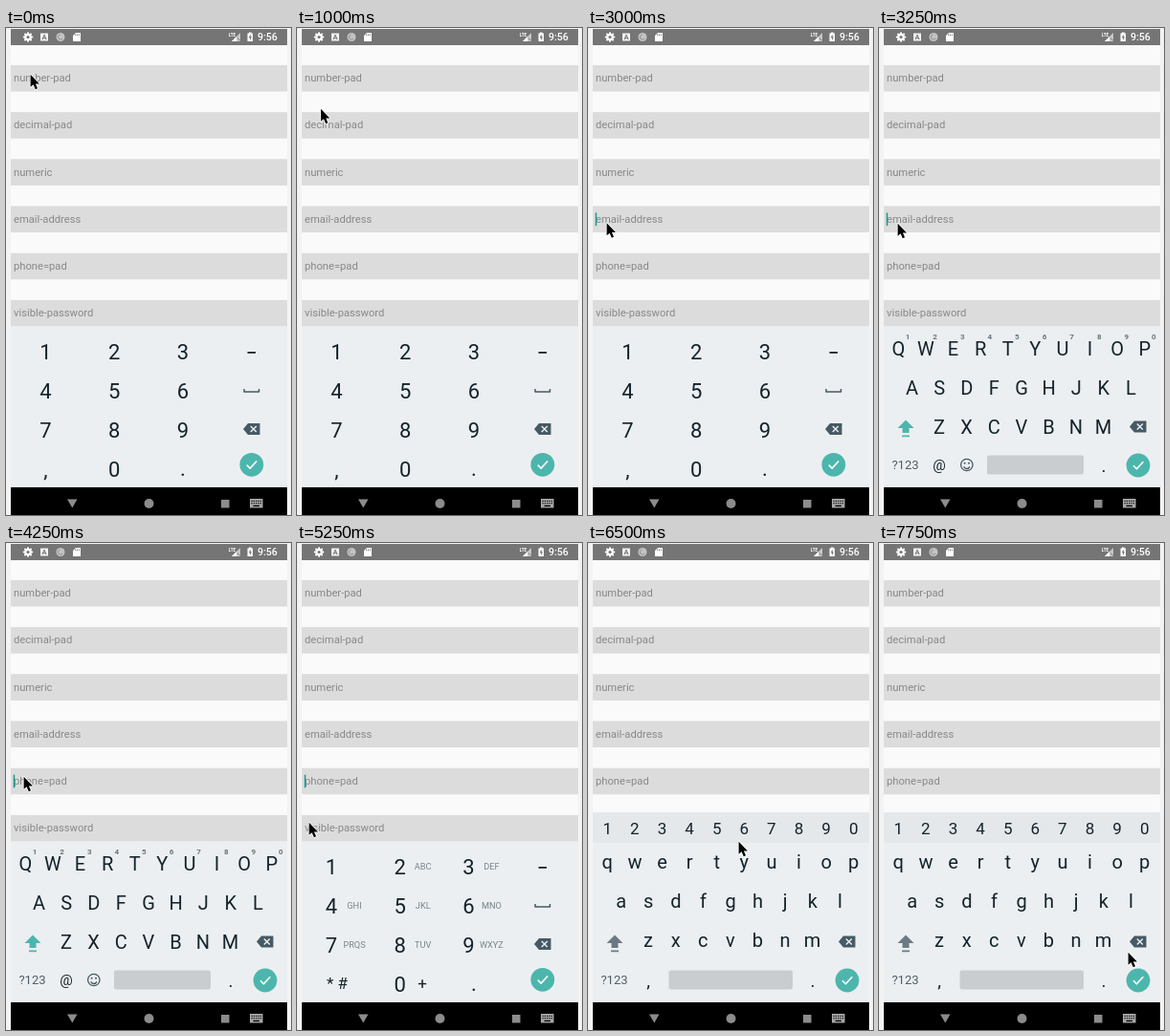
An HTML page with a canvas for the animation above (8000 ms loop, 298 px wide and 510 px high).

```html
<!DOCTYPE html>
<html lang="en">
<head>
<meta charset="utf-8">
<title>Keyboard types</title>
<style>
  html, body { margin: 0; width: 100%; height: 100%; overflow: hidden; background: #f3f3f3; }
  canvas { display: block; width: 298px; height: 510px; }
</style>
</head>
<body>
<canvas id="stage" width="298" height="510"></canvas>
<script>
const ctx = document.getElementById('stage').getContext('2d');
const LOOP = 8000, STEP = 250;
const INK = '#14232b', ICON = '#455a64', TEAL = '#4db6ac', KEYS = '#eceff1';
const BAR = '#757575', NAV = '#8c8c8c';
const TOP = 38.9, PITCH = 49.2, COL = 28.6, PAD_COL = 71.7, PAD_ROW = 40.8;
const fields = ['number-pad', 'decimal-pad', 'numeric', 'email-address', 'phone=pad', 'visible-password'];

// Step at which each field is tapped
const taps = [2, 5, 8, 12, 17, 22];
// Pointer stops: step, x, y
const stops = [
  [2, 25, 48], [5, 24, 102], [7, 21, 147], [8, 21, 149], [11, 19, 203], [13, 19, 204],
  [17, 18, 244], [21, 12, 292], [25, 12, 292], [26, 157, 312], [30, 266, 428], [31, 260, 428]
];

function rect(x, y, w, h, color) {
  ctx.fillStyle = color;
  ctx.fillRect(x, y, w, h);
}

function disc(x, y, r, color) {
  ctx.fillStyle = color;
  ctx.beginPath();
  ctx.arc(x, y, r, 0, Math.PI * 2);
  ctx.fill();
}

function arc(x, y, r, from, to, color, width) {
  ctx.beginPath();
  ctx.arc(x, y, r, from, to);
  ctx.strokeStyle = color;
  ctx.lineWidth = width;
  ctx.stroke();
}

// SVG path drawn relative to (x, y)
function icon(d, x, y, fill, stroke, width) {
  const shape = new Path2D(d);
  ctx.save();
  ctx.translate(x, y);
  ctx.lineJoin = 'round';
  if (stroke) {
    ctx.strokeStyle = stroke;
    ctx.lineWidth = width;
    ctx.stroke(shape);
  }
  if (fill) {
    ctx.fillStyle = fill;
    ctx.fill(shape);
  }
  ctx.restore();
}

function text(str, x, y, size, color = INK, align = 'center', weight = 400) {
  ctx.font = `${weight} ${size}px Roboto, sans-serif`;
  ctx.textAlign = align;
  ctx.fillStyle = color;
  ctx.fillText(str, x, y);
}

function row(chars, x, y, size, color, weight) {
  [...chars].forEach((c, i) => text(c, x + i * COL, y, size, color, 'center', weight));
}

// Three-column grid of pad labels
function grid(labels, x, y, size, color) {
  labels.forEach((s, i) =>
    text(s, x + (i % 3) * PAD_COL, y + Math.floor(i / 3) * PAD_ROW, size, color));
}

function statusBar() {
  rect(5, 1, 289, 17, BAR);
  // gear
  for (let i = 0; i < 8; i++) {
    const a = i * Math.PI / 4;
    disc(23 + 4.2 * Math.cos(a), 9.5 + 4.2 * Math.sin(a), 1.1, '#fff');
  }
  disc(23, 9.5, 3.8, '#fff');
  disc(23, 9.5, 1.6, BAR);
  rect(36, 5.5, 8, 8, '#f2f2f2');
  text('A', 40, 12.3, 7.5, BAR, 'center', 700);
  disc(57, 9.5, 4.5, '#c4c4c4');
  arc(57, 9.5, 2.6, 0.6, 4.6, '#909090', 1);
  // memory card
  icon('M3 0h5v9h-8v-6z', 70, 5, '#fff');
  for (let i = 0; i < 3; i++) rect(72.3 + i * 1.8, 6.3, 0.8, 2, BAR);
  // signal
  text('LTE', 236.3, 8.5, 4.5, '#fff', 'center', 700);
  icon('M9 0v9h-9z', 236, 5, '#c8c8c8');
  icon('M5 0v5h-5z', 236, 9, '#fff');
  icon('M0 0l3 3', 242, 10.5, null, BAR, 1);
  // battery
  rect(254, 4.5, 2.5, 1.5, '#fff');
  rect(252.5, 5.5, 5.5, 8.5, '#fff');
  icon('M2 0l-2 3.7h1.3v2.8l2-3.8h-1.3z', 253.7, 6.5, BAR);
  text('9:56', 263, 13.2, 10.6, '#fff', 'left', 500);
}

function navBar() {
  rect(5, 481, 289, 29, '#000');
  icon('M0 0h10.5l-5.2 9z', 64, 493.5, NAV);
  disc(149.5, 498, 5, NAV);
  rect(225, 494, 8.5, 8.5, NAV);
  rect(255, 493, 13.5, 9.5, '#a8a8a8');
  for (let i = 0; i < 10; i++)
    rect(256.5 + (i % 5) * 2.3, 494.8 + Math.floor(i / 5) * 2.3, 1.2, 1.2, '#000');
  rect(258.5, 499.8, 6.5, 1.3, '#000');
}

function form() {
  fields.forEach((name, i) => {
    const y = TOP + i * PITCH;
    rect(5, y, 289, 27.6, '#dcdcdc');
    text(name, 8, y + 17.2, 11.2, '#888', 'left');
  });
}

// The caret blinks two steps on, two off, from the moment of the tap
function caret(step) {
  const i = taps.findLastIndex(t => t <= step);
  if (i < 0 || (step - taps[i]) % 4 > 1) return;
  rect(7.7, TOP + 7 + i * PITCH, 1.5, 13.6, '#159a8c');
}

function enterKey(x, y) {
  disc(x, y, 12.4, TEAL);
  icon('M-5 .3l3.4 3.5l6.9-7.6', x, y, null, '#fff', 1.6);
}

function backspace(x, y) {
  icon('M-9 0l5-6h12.5v12h-12.5z', x, y, ICON);
  icon('M-1.2-3l6 6m0-6l-6 6', x, y, null, KEYS, 1.4);
}

function shiftKey(color) {
  icon('M0 0l8.5 8.5h-5v5h-7v-5h-5zM-4 16h8v1.7h-8z', 28, 410.5, color);
}

function spaceBar(x) {
  ctx.fillStyle = '#c9cdd0';
  ctx.beginPath();
  ctx.roundRect(x, 447.5, 214 - x, 20, 2);
  ctx.fill();
}

function padSide() {
  rect(252.5, 339, 8.5, 1.8, INK);
  icon('M0 0v3h15.5v-3', 249, 378, null, ICON, 1.5);
  backspace(257, 420);
  enterKey(256.8, 457.3);
  text('.', 185, 469, 22);
}

function numberPad() {
  grid([...'123456789,0'], 41.5, 347.3, 22);
  padSide();
}

function phonePad() {
  grid([...'123456789', '', '0'], 36, 347.3, 22);
  grid(['', 'ABC', 'DEF', 'GHI', 'JKL', 'MNO', 'PRQS', 'TUV', 'WXYZ'], 60, 342.3, 9.2, '#77858c');
  text('* #', 42, 467, 17);
  text('+', 131, 467, 17);
  padSide();
}

function letters(r1, r2, r3, y) {
  row(r1, 20.3, y, 20);
  row(r2, 34.6, y + 41.2, 20);
  row(r3, 63, y + 82.4, 20);
  backspace(271, 417.5);
  text('?123', 27.5, 462.3, 13, '#4f5d65');
  text('.', 235, 465, 19);
  enterKey(271, 458);
}

function emailKeys() {
  letters('QWERTYUIOP', 'ASDFGHJKL', 'ZXCVBNM', 342.5);
  row('1234567890', 30, 326.3, 8, '#66757d', 700);
  shiftKey(TEAL);
  text('@', 63, 463, 15);
  // smiley
  arc(91.8, 457.5, 6.2, 0, Math.PI * 2, ICON, 1.3);
  arc(91.8, 458.2, 3.3, 0.35, Math.PI - 0.35, ICON, 1.3);
  disc(89.6, 455.7, 1, ICON);
  disc(94, 455.7, 1, ICON);
  spaceBar(113);
}

function passwordKeys() {
  rect(5, 282, 289, 32, '#e4e8ea');
  row('1234567890', 20.3, 305, 17);
  letters('qwertyuiop', 'asdfghjkl', 'zxcvbnm', 340.8);
  shiftKey('#6b7a82');
  text(',', 63, 465, 19);
  spaceBar(84.5);
}

function pointer(step) {
  const i = Math.max(0, stops.findLastIndex(s => s[0] <= step));
  const [t0, x0, y0] = stops[i], [t1, x1, y1] = stops[i + 1] || stops[i];
  const k = t1 > t0 ? Math.max(0, (step - t0) / (t1 - t0)) : 0;
  icon('M0 0v13l3-2.6l2.2 5l2.2-1l-2.1-4.7h4.1z',
    x0 + (x1 - x0) * k + 0.6, y0 + (y1 - y0) * k + 0.8, '#000', '#fff', 1.6);
}

function draw(time) {
  const step = Math.floor((time % LOOP) / STEP);
  rect(0, 0, 298, 510, '#f3f3f3');
  rect(5, 1, 289, 509, '#fafafa');
  statusBar();
  form();
  caret(step);
  rect(5, 313, 289, 168, KEYS);
  // the layout follows the tap one step later
  if (step <= taps[3]) numberPad();
  else if (step <= taps[4]) emailKeys();
  else if (step < taps[5]) phonePad();
  else passwordKeys();
  navBar();
  pointer(step);
}

const start = performance.now();
function tick() {
  draw(performance.now() - start);
  requestAnimationFrame(tick);
}
tick();
</script>
</body>
</html>
```
